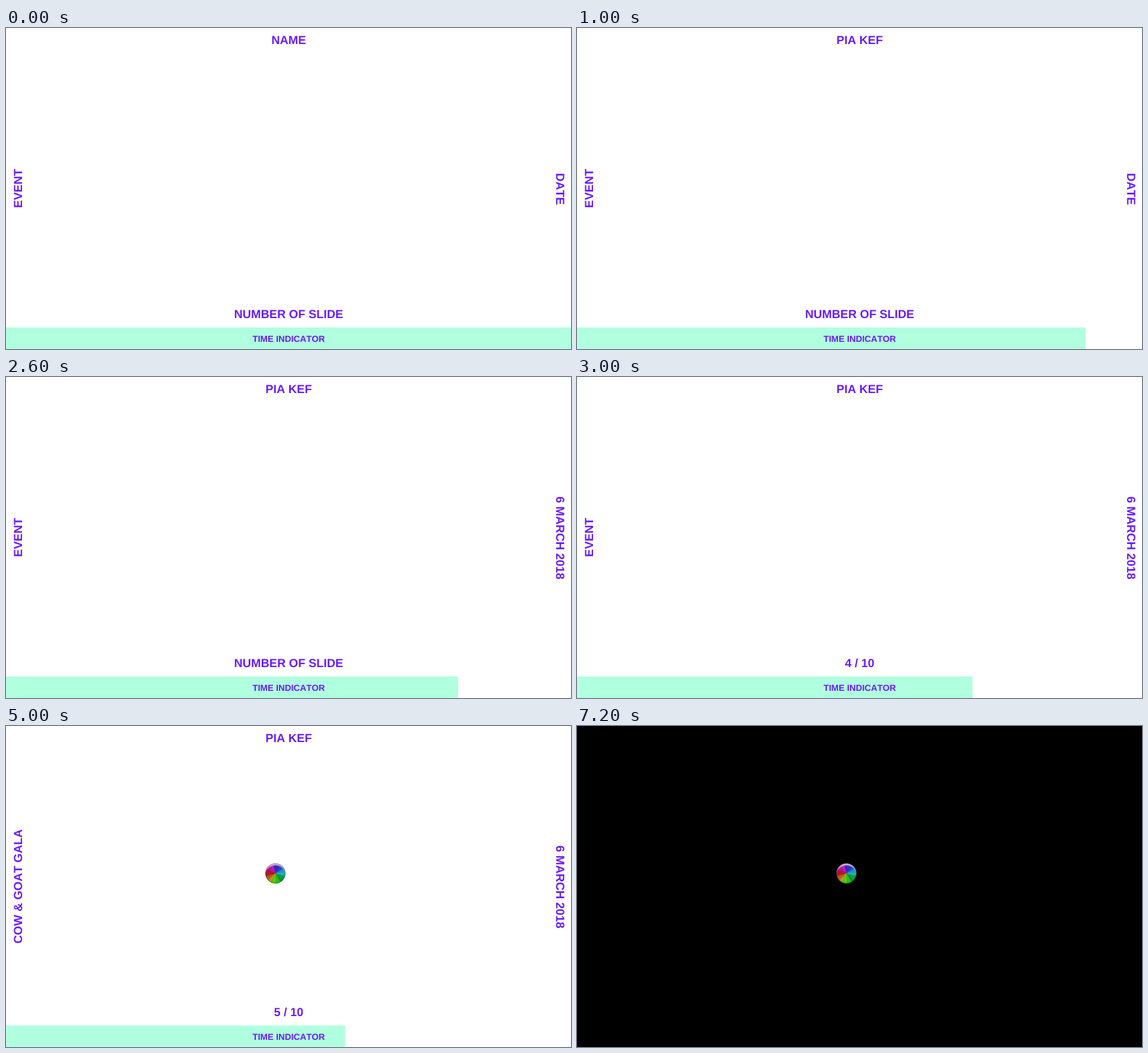
Write an HTML page that moves like this. It is 950 by 540 pixels and loops after 8 s.

```html
<!DOCTYPE html>
<html lang="en">
<head>
<meta charset="utf-8">
<style>
  html, body { margin: 0; width: 100%; height: 100%; overflow: hidden; background: #fff; }
  svg { position: absolute; left: 0; top: 0; }
  text {
    font: bold 19.8px "Liberation Sans", Arial, sans-serif;
    font-kerning: none;
    text-rendering: geometricPrecision;
    text-anchor: middle;
    fill: #6a1bff;
  }
  #ball {
    position: absolute; left: 436px; top: 231px; width: 34px; height: 34px;
    border-radius: 50%;
    background:
      radial-gradient(circle 17px, #0000 88%, #2238 100%),
      radial-gradient(circle 21px at 50% 21px, #fff0 78%, #fffc 92%),
      repeating-conic-gradient(#0000 0deg, #0003 28deg, #0000 30deg),
      conic-gradient(#4a20c8, #2b46e0 45deg, #22d2cc 85deg, #18b890 105deg, #0ca030 135deg,
        #38e810 175deg, #88d010 200deg, #c89020 228deg, #d04018 250deg, #c01028 275deg,
        #c818a0 310deg, #c028d8 335deg, #4a20c8);
  }
</style>
</head>
<body>
<svg width="950" height="540">
  <g id="slide">
    <rect id="bar" y="503.8" height="36.2" fill="#b0ffdf"/>
    <text id="name" x="475.3" y="27"></text>
    <text id="event" transform="translate(27 269.8) rotate(-90)"></text>
    <text id="date" transform="translate(925 270.8) rotate(90)"></text>
    <text id="page" x="475.3" y="488"></text>
    <text x="475.3" y="528" style="font-size:14.8px">TIME INDICATOR</text>
  </g>
</svg>
<div id="ball"></div>
<script>
const $ = id => document.getElementById(id);
const LOOP = 8000;
const start = performance.now();

function draw(now) {
  const s = Math.floor(Math.max(0, now - start) % LOOP / 1000);
  const dark = s >= 6;
  const step = Math.min(s, 4);

  document.body.style.background = dark ? '#000' : '#fff';
  $('slide').style.display = dark ? 'none' : '';
  $('ball').style.display = s >= 5 ? '' : 'none';

  $('bar').setAttribute('width', 950 - 95 * step);
  $('name').textContent = s < 1 ? 'NAME' : 'PIA KEF';
  $('date').textContent = s < 2 ? 'DATE' : '6 MARCH 2018';
  $('page').textContent = s < 3 ? 'NUMBER OF SLIDE' : `${step + 1} / 10`;
  $('event').textContent = s < 4 ? 'EVENT' : 'COW & GOAT GALA';
}

function tick() {
  draw(performance.now());
  requestAnimationFrame(tick);
}
tick();
</script>
</body>
</html>
```
